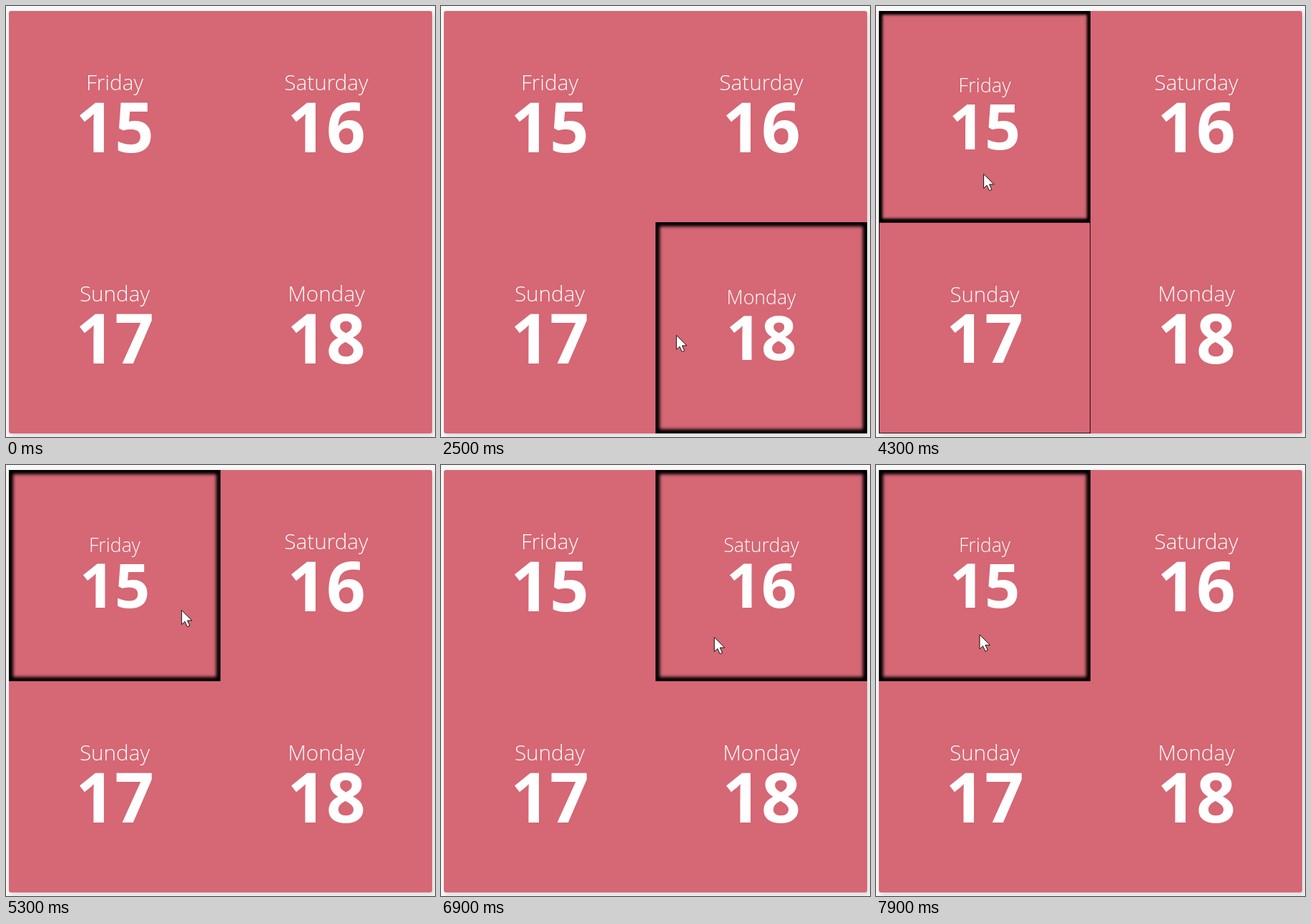
An HTML page for the animation above (8 s loop, 600 px wide and 604 px high).

```html
<!DOCTYPE html>
<html lang="en">
<head>
<meta charset="utf-8">
<title>Calendar tiles</title>
<style>
html, body { margin: 0; width: 100%; height: 100%; overflow: hidden; background: #f8f8f8; }
#card {
  position: absolute; left: 4px; top: 7px; width: 592px; height: 592px;
  display: grid; grid-template: 296px 296px / 296px 296px;
  background: #d66774; border-radius: 3px; box-shadow: 2px 3px 6px rgba(0, 0, 0, .14);
}
svg { display: block; width: 100%; height: 100%; }
text { font-family: "Open Sans", "Noto Sans", sans-serif; fill: #fff; text-anchor: middle; }
.day { font-size: 29.7px; font-weight: 300; }
.date { font-size: 96px; font-weight: 700; }
#pointer { position: absolute; left: 0; top: 0; }
</style>
</head>
<body>
<div id="card"></div>
<svg id="pointer">
  <path id="arrow" d="M.5.5V20.5L5 16.3L8.4 23.7L11.8 22.2L8.5 15H15Z" fill="#fff" stroke="#111"/>
  <path id="beam" d="M-6-11H6M0-11V11M-6 11H6" fill="none" stroke="#3d8581" stroke-width="1.6"/>
</svg>
<script>
const LOOP = 8000, FADE = 500, SAMPLES = 50;
const LEFT = 4, TOP = 7, SIZE = 296, MID = SIZE / 2;
const card = document.getElementById('card');
const arrow = document.getElementById('arrow');
const beam = document.getElementById('beam');

const tiles = ['Friday', 'Saturday', 'Sunday', 'Monday'].map((day, i) => {
  const el = document.createElement('div');
  el.innerHTML = `<svg><g><text class="day" x="${MID}" y="111">${day}</text>
    <text class="date" x="${MID}" y="198">${15 + i}</text></g></svg>`;
  card.append(el);
  return { el, group: el.querySelector('g') };
});

// Pointer stops: time, x, y
const path = [
  [1450, 600, 585], [1500, 565, 515], [2500, 329, 461], [3400, 128, 400],
  [4300, 150, 235], [5300, 245, 203], [6200, 405, 230], [6900, 382, 241], [8000, 121, 237]
];

function pointerAt(t) {
  const i = path.findIndex(p => p[0] > t);
  if (i < 1) return [-50, -50];
  const [t0, x0, y0] = path[i - 1], [t1, x1, y1] = path[i];
  const p = (t - t0) / (t1 - t0);
  return [x0 + (x1 - x0) * p, y0 + (y1 - y0) * p];
}

function tileAt(t) {
  const [x, y] = pointerAt(t);
  const col = Math.floor((x - LEFT) / SIZE), row = Math.floor((y - TOP) / SIZE);
  return col === 0 || col === 1 ? row * 2 + col : -1;
}

// A tile's highlight follows the share of the last FADE ms spent over it.
function highlights(t) {
  const share = [0, 0, 0, 0];
  for (let k = 0; k < SAMPLES; k++) share[tileAt(t - k * FADE / SAMPLES)] += 1 / SAMPLES;
  return share.map(p => p * p * (3 - 2 * p));
}

function overText(x, y) {
  const dx = Math.abs((x - LEFT) % SIZE - MID), dy = (y - TOP) % SIZE;
  return dx < 50 && dy > 80 && dy < 210;
}

function draw(t) {
  const levels = highlights(t);
  tiles.forEach(({ el, group }, i) => {
    const h = levels[i];
    el.style.boxShadow = h > 0 ? `inset 0 0 ${4 * h}px ${6 * h}px #000` : 'none';
    group.setAttribute('transform',
      `translate(${MID} ${MID}) scale(${1 - .1 * h}) translate(${-MID} ${-MID})`);
  });
  const [x, y] = pointerAt(t), text = overText(x, y);
  for (const shape of [arrow, beam]) shape.setAttribute('transform', `translate(${x} ${y})`);
  arrow.style.display = text ? 'none' : '';
  beam.style.display = text ? '' : 'none';
}

const start = performance.now();
function frame() {
  draw((performance.now() - start) % LOOP);
  requestAnimationFrame(frame);
}
frame();
</script>
</body>
</html>
```
